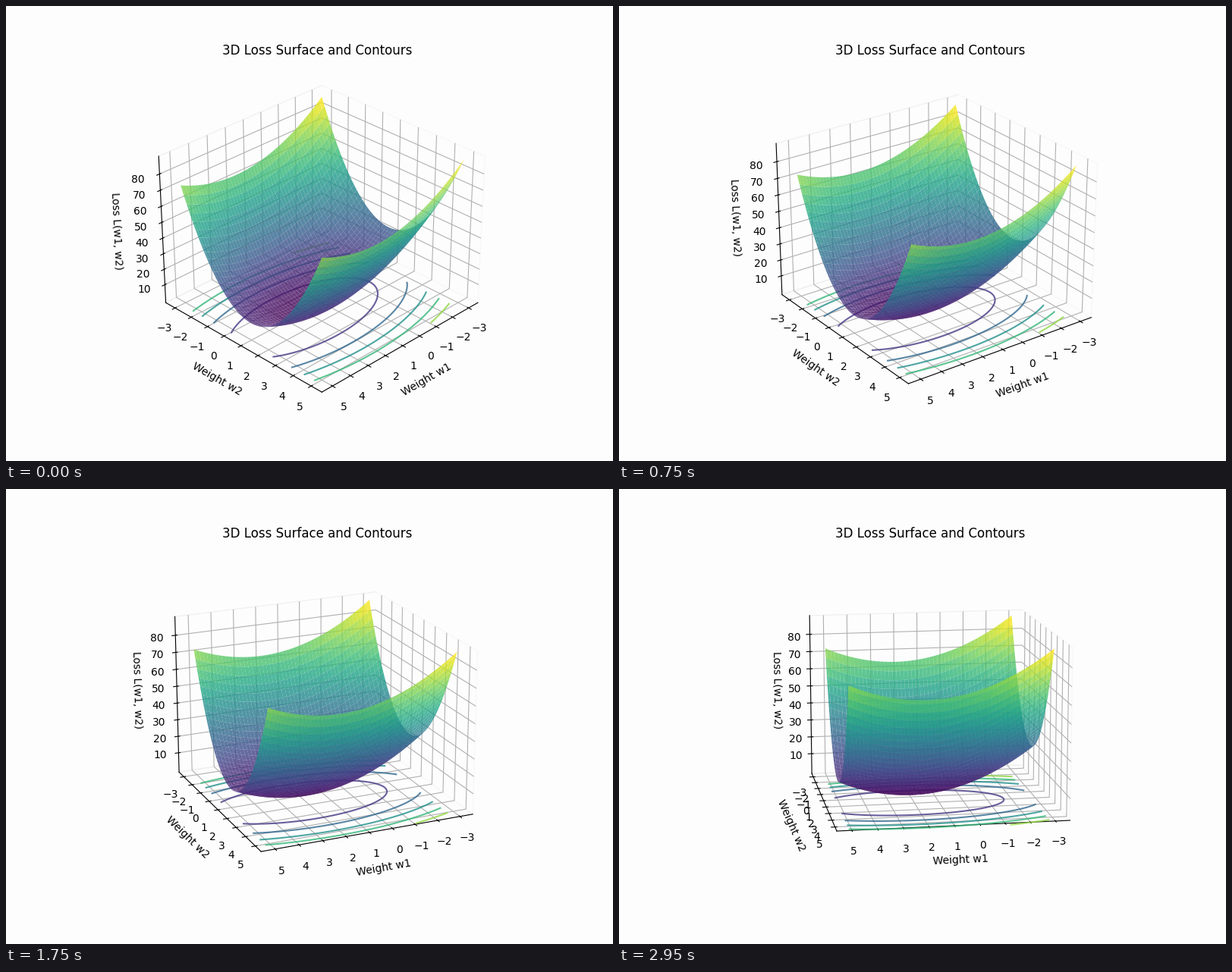
Recreate the animation shown at these times as a matplotlib script. Size 800 by 600 pixels, loop 3 s.

```python
import numpy as np
import matplotlib.pyplot as plt
from matplotlib.animation import FuncAnimation

FRAMES, INTERVAL = 60, 50
PAPER = "#fdfdfd"


def padded(lo, hi, margin):
    pad = (hi - lo) * margin
    return lo - pad, hi + pad


# Quadratic loss with its minimum at (2, 1)
w = np.linspace(-3, 5, 100)
W1, W2 = np.meshgrid(w, w)
loss = (W1 - 2) ** 2 + 4 * (W2 - 1) ** 2

fig = plt.figure(figsize=(8, 6), dpi=100, facecolor=PAPER)
ax = fig.add_subplot(projection="3d", facecolor=PAPER)

ax.plot_surface(W1, W2, loss, cmap="viridis", alpha=0.8, edgecolor="none")
ax.contour(W1, W2, loss, zdir="z", offset=-5, cmap="viridis", alpha=0.8)

side = padded(*padded(-3, 5, 0.05), 1 / 48)
ax.set_xlim(side)
ax.set_ylim(side)
ax.set_zlim(padded(loss.min(), loss.max(), 1 / 48))
ax.set_zticks(range(10, 90, 10))

ax.set_title("3D Loss Surface and Contours")
ax.set_xlabel("Weight w1")
ax.set_ylabel("Weight w2")
ax.set_zlabel("Loss L(w1, w2)")
for axis in (ax.xaxis, ax.yaxis, ax.zaxis):
    axis.pane.set_fill(False)


def update(i):
    """Orbit the camera while it sinks towards the floor."""
    ax.view_init(elev=30 - 0.3 * i, azim=45 + 0.6 * i)
    return ()


anim = FuncAnimation(fig, update, frames=FRAMES, interval=INTERVAL,
                     repeat=True, repeat_delay=0, blit=False)
plt.show()
```
